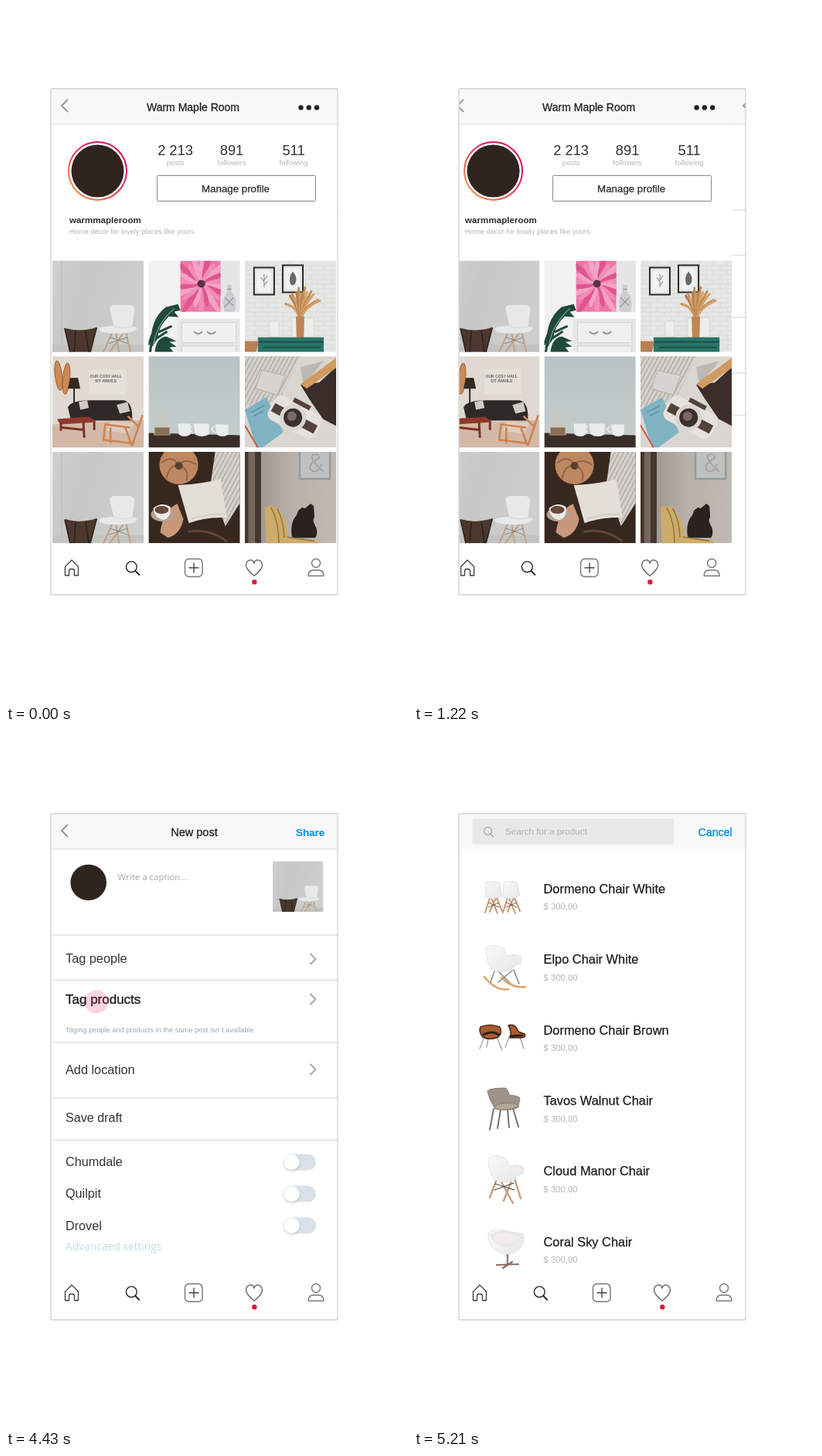
An HTML page that plays this animation: 520 by 902 pixels, repeating every 8000 ms.

```html
<!DOCTYPE html>
<html lang="en">
<head>
<meta charset="utf-8">
<title>Tagging products</title>
<style>
html, body { margin: 0; width: 100%; height: 100%; overflow: hidden; background: #fff; }
svg { display: block; }
text { font-family: "Liberation Sans", Arial, sans-serif; }
.open { font-family: "Open Sans", sans-serif; }
.line { fill: none; stroke-linecap: round; stroke-linejoin: round; }
</style>
</head>
<body>
<svg width="520" height="902" viewBox="0 0 520 902">
<defs>
  <clipPath id="phone"><rect x="58.5" y="107" width="370.5" height="655"/></clipPath>
  <linearGradient id="ring" x1="1" y1="0" x2="0" y2="1">
    <stop offset=".3" stop-color="#e0115f"/><stop offset="1" stop-color="#f8a13c"/>
  </linearGradient>
  <linearGradient id="wall" x2="1" y2=".3">
    <stop stop-color="#cfd0ce"/><stop offset=".4" stop-color="#c6c8c6"/><stop offset="1" stop-color="#cdcfcd"/>
  </linearGradient>
  <linearGradient id="mist" x2="0" y2="1">
    <stop stop-color="#b9c3c3"/><stop offset="1" stop-color="#c6cdcc"/>
  </linearGradient>
  <linearGradient id="dusk" x2="1">
    <stop stop-color="#968c84"/><stop offset=".5" stop-color="#b8b0a9"/><stop offset="1" stop-color="#c1bab3"/>
  </linearGradient>
  <linearGradient id="shell" x2="1" y2="1">
    <stop stop-color="#f8f8f8"/><stop offset="1" stop-color="#e6e7e9"/>
  </linearGradient>
  <filter id="soft" x="-50%" y="-50%" width="200%" height="200%">
    <feDropShadow dx="0" dy="2" stdDeviation="2" flood-opacity=".15"/>
  </filter>
  <pattern id="print" width="5" height="5" patternUnits="userSpaceOnUse" patternTransform="rotate(28)">
    <path fill="#d4d1cc" d="M0 0h5v5h-5z"/><path fill="#b2aea8" d="M0 0h1.6v5h-1.6z"/>
  </pattern>
  <pattern id="brick" width="18" height="12" patternUnits="userSpaceOnUse">
    <path fill="#e6e6e4" d="M0 0h18v12h-18z"/>
    <path class="line" stroke="#dad9d6" d="M0 .5H18M0 6.5H18M4 0V6M13 6V12"/>
  </pattern>

  <symbol id="chair" viewBox="0 0 118 118">
    <path fill="url(#wall)" d="M0 0h118v118H0z"/>
    <path stroke="#bbbdbb" d="M12 0V118"/>
    <path fill="#c3c3c0" d="M0 108h118v10H0z"/>
    <path fill="#4b372e" d="M16 87q20 6 41-1l-8 32H22z"/>
    <path class="line" stroke="#2a1f1b" stroke-width="1.5" d="M16 88l7 30M30 91l-2 27M43 91l4 27M57 87l-8 31"/>
    <path class="line" stroke="#c4a183" stroke-width="2" d="M77 93L66 118M82 93l4 25M95 93l6 25M92 93L74 118"/>
    <path class="line" stroke="#777" stroke-width=".8" d="M75 99l22 8M97 99l-24 8"/>
    <path fill="#e7e8e8" d="M74 62q0-5 7-5h18q7 0 7 6l-3 22q7 0 6 3-3 6-25 6-23 0-24-6 0-3 19-4z"/>
    <path class="line" stroke="#d5d6d6" d="M79 84q12 5 24 1"/>
  </symbol>

  <symbol id="flower" viewBox="0 0 118 118">
    <path fill="#f1f1f1" d="M0 0h118v118H0z"/>
    <path fill="#e5e5e5" d="M93 0h25v66H93z"/>
    <svg x="41" width="52" height="66">
      <path fill="#ee74a8" d="M0 0h52v66H0z"/>
      <g id="petals"></g>
      <circle cx="27" cy="30" r="5" fill="#5b3340"/>
    </svg>
    <path fill="#cccdd0" d="M101 31h6v10q9 8 4 25H98q-5-15 3-25z"/>
    <path class="line" stroke="#8f9095" d="M99 48l10 10M109 48L98 60M102 37h4"/>
    <path fill="#fafafa" d="M33 67h85v8H33z"/>
    <path fill="#e6e6e6" d="M37 75h81v43H37z"/>
    <path fill="#efefef" stroke="#d2d2d2" d="M43 80h70v26H43zM43 110h70v12H43z"/>
    <path class="line" stroke="#999" stroke-width="2" d="M59 92q5 5 10 0M76 92q5 5 10 0"/>
    <path fill="#20493a" d="M4 112Q0 78 22 60l16-4 3 8-8 2 6 7-13-1Q12 86 12 100zM8 118q2-19 15-20l13 6-9 1 9 6-9 1 5 6z"/>
    <path class="line" stroke="#20493a" stroke-width="3" d="M2 118Q4 94 18 78M0 108l9-24M14 92l15-7M11 100l12-8"/>
    <path class="line" stroke="#8aa898" d="M6 110Q10 82 33 62"/>
  </symbol>

  <symbol id="wheat" viewBox="0 0 118 118">
    <path fill="url(#brick)" d="M0 0h118v118H0z"/>
    <path fill="#e4e8e6" stroke="#2b2b2b" stroke-width="2" d="M12 9h26v35H12zM49 6h26v35H49z"/>
    <path fill="#f1f2ef" d="M16 13h18v27H16zM53 10h18v27H53z"/>
    <path class="line" stroke="#8a8d8b" d="M25 34V18M25 27l-4-5M25 25l4-5M25 32l4-5"/>
    <path fill="#666b69" d="M62 14q7 8 3 16-4 4-6 0-3-8 3-16z"/>
    <path fill="#eeedeb" stroke="#d6d5d2" d="M32 78h12v20H32zM61 74h28v25H61z"/>
    <g id="sheaf"></g>
    <path fill="#bd8654" d="M66 72h11l-1 33H67z"/>
    <path fill="#2a7468" d="M17 99h85v19H17z"/>
    <path class="line" stroke="#175049" stroke-width="2" d="M18 105h83M25 112h72"/>
    <path fill="#b78154" d="M0 104h18l-3 14H0z"/>
  </symbol>

  <symbol id="lounge" viewBox="0 0 118 118">
    <path fill="#dfd9d2" d="M0 0h118v118H0z"/>
    <path fill="#d3b8a8" d="M0 88l118-6v36H0z"/>
    <g fill="#cd8a55" stroke="#9c6036">
      <ellipse cx="8" cy="25" rx="4.500" ry="19" transform="rotate(-7 8 25)"/>
      <ellipse cx="18" cy="29" rx="4.500" ry="20" transform="rotate(5 18 29)"/>
    </g>
    <path fill="#34291f" d="M23 28h10l3 14H20zM27 42h2v28h-2z"/>
    <path fill="#e5e0d9" d="M47 17h48v32H47z"/>
    <text x="69" y="28" font-size="5" font-weight="700" text-anchor="middle" fill="#666">OUR COSY HALL</text>
    <text x="69" y="34" font-size="5" font-weight="700" text-anchor="middle" fill="#666">SIT AWHILE</text>
    <path fill="#2f2928" d="M20 66q4-9 30-9h42q12 2 11 26H24z"/>
    <path fill="#cfc9c2" d="M34 59l11-2 2 10-11 2zM83 63l14-4 3 12-13 3z"/>
    <path fill="#8f392b" d="M6 81l42-3 9 7-47 3z"/>
    <path class="line" stroke="#7d3125" stroke-width="3" d="M11 87v8M40 86l1 18M54 86v8M13 92l27 3"/>
    <path fill="#dfcdbd" d="M76 84l30 2-8 14-28-4z"/>
    <path class="line" stroke="#cb8550" stroke-width="2.600" d="M116 77l-13 38M68 88l32 4M68 90l-2 18 34 4M75 93v18M98 78l12 12M94 92l8 22"/>
  </symbol>

  <symbol id="cups" viewBox="0 0 118 118">
    <path fill="url(#mist)" d="M0 0h118v118H0z"/>
    <path fill="#3a2d2a" d="M0 99l118 3v16H0z"/>
    <path fill="#c8c8c0" d="M9 72h17l-4 11 6 7v12H7V90l6-7z"/>
    <path fill="#8b6e57" d="M8 92h19v10H8z"/>
    <path fill="#ebedeb" d="M38 87h16v14q-8 5-15 0zM58 87h20v14q-9 5-18 0zM86 88h17v13q-8 5-15 0z"/>
    <path class="line" stroke="#e6e8e6" stroke-width="2" d="M56 90q-5 4 0 8M84 91q-5 4 1 7"/>
  </symbol>

  <symbol id="desk" viewBox="0 0 118 118">
    <path fill="#d9d6d1" d="M0 0h118v118H0z"/>
    <path fill="url(#print)" d="M0 0h72L44 58 0 66z"/>
    <path fill="#d6d4d0" stroke="#b5b2ad" d="M22 18l30 7-10 25-28-8z"/>
    <path fill="#bdb7b1" d="M72 14l30-8-26 32z"/>
    <path fill="#3b2e2a" d="M72 37l24-3 22-20v76l-17-9-18-26z"/>
    <path fill="#d09a60" d="M118 2v13L80 42l-8-6z"/>
    <path fill="#80b3c4" d="M0 69l28-16 22 45-27 20h-8z"/>
    <path stroke="#cf5545" stroke-width="2" d="M0 89l17 29"/>
    <path class="line" stroke="#5a8fa2" stroke-width="1.500" d="M9 72l16-8M12 77l12-6"/>
    <g transform="rotate(28 64 78)">
      <rect x="31" y="61" width="68" height="35" rx="9" fill="#e6e1dc"/>
      <path fill="#54423a" d="M34 74h62v12H34zM53 56h24v6H53z"/>
      <circle cx="63" cy="80" r="17" fill="#d9d4cf"/>
      <circle cx="63" cy="80" r="12" fill="#3a302d"/>
      <circle cx="61" cy="79" r="6" fill="#7c6b64"/>
    </g>
  </symbol>

  <symbol id="coffee" viewBox="0 0 118 118">
    <path fill="#37281f" d="M0 0h118v118H0z"/>
    <path fill="url(#print)" d="M86 0h32v66L99 96 80 42z"/>
    <circle cx="39" cy="17" r="25" fill="#bd8760"/>
    <path class="line" stroke="#946445" stroke-width="2" d="M17 14q15-11 22 4M23 34q4-18 16-16M49 37q4-15-10-19M61 16q-16-9-22 2"/>
    <circle cx="39" cy="18" r="5" fill="#5c3e2d"/>
    <path fill="#c9977a" d="M15 104q4-28 22-37l8 20q-4 20-20 24z"/>
    <path fill="#e3ded8" d="M38 43q30-1 55-8l8 50q-27-1-49 7z"/>
    <path class="line" stroke="#d5cec6" stroke-width="2" d="M56 86q26-7 42-5"/>
    <ellipse cx="18" cy="81" rx="15" ry="9" fill="#b5a195"/>
    <path fill="#efebe7" d="M6 73q11-9 22-2 2 13-8 17-12-1-14-15z"/>
    <ellipse cx="17" cy="75" rx="9" ry="5" fill="#6a4838"/>
    <path class="line" stroke="#5f4638" stroke-width="3" d="M52 103q28-4 48 12"/>
  </symbol>

  <symbol id="cat" viewBox="0 0 118 118">
    <path fill="url(#dusk)" d="M0 0h118v118H0z"/>
    <path fill="#44372f" d="M0 0h5v118H0zM13 0h8v118H13z"/>
    <path fill="#776458" d="M5 0h8v118H5z"/>
    <path fill="#bfc1c0" stroke="#949c9e" stroke-width="2.500" d="M71-2h39v37H71z"/>
    <path class="line" stroke="#a0a6a7" stroke-width="2" d="M101 25Q82 8 88 4q8-3 8 4-16 9-10 16 8 5 13-8"/>
    <path fill="#29221f" d="M61 111q-3-20 6-29l2-6 5-4 4 1 7-6 4 3 1 14q-3 5 0 9 6 11 1 18z"/>
    <path fill="#cdab69" d="M26 73q6-6 14-1 14 10 17 38l35 4 4 6H28z"/>
    <path class="line" stroke="#94743f" stroke-width="1.500" d="M34 72q10 18 10 45M42 74q8 14 9 36M55 110l34 5"/>
  </symbol>

  <g id="nav" class="line" stroke="#444" stroke-width="1.4">
    <path d="M76.500 725.500L85 717l8.500 8.500V737H88.500V731q0-2.500-3.500-2.500t-3.500 2.500V737H76.500z"/>
    <circle cx="162.300" cy="725.800" r="6.900" stroke="#222"/>
    <path stroke="#222" stroke-width="1.800" d="M167.300 731l5 5"/>
    <g stroke="#777"><rect x="231.500" y="715.500" width="22.500" height="23" rx="5"/><path stroke="#444" d="M237 727h12M243 721v12"/></g>
    <path stroke="#666" d="M321 737.500Q310 728.500 310.500 723q1-6 6-6 3.500 0 4.500 4 1-4 4.500-4 5 0 6 6 .5 5.500-10.500 14.500z"/>
    <g stroke="#777"><circle cx="401" cy="721" r="5.500"/><path d="M391 737.500q0-7.500 7-7.500h6q7 0 7 7.500z"/></g>
    <circle cx="321.300" cy="745.500" r="3.200" fill="#e5173f" stroke="none"/>
  </g>
</defs>
<g clip-path="url(#phone)"><g id="strip"></g></g>
<rect x="58" y="107" width="371" height="655" rx="1" fill="none" stroke="#d2d2d2" stroke-width="1.300"/>
<circle id="tap" fill="#ee2858"/>
</svg>
<script>
const $ = id => document.getElementById(id);
const WIDTH = 370, LOOP = 8000, STEP = 30;

// bold is an outline width that thickens the letters
const text = (x, y, size, str, fill = '#333', bold = 0, more = '') =>
  `<text x="${x}" y="${y}" font-size="${size}" fill="${fill}" stroke="${fill}" stroke-width="${bold}" ${more}>${str}</text>`;
const mid = 'text-anchor="middle"';
const path = (d, stroke, width = 1.5, fill = 'none') =>
  `<path class="line" d="${d}" stroke="${stroke}" stroke-width="${width}" style="fill:${fill}"/>`;
const image = (id, x, y, size) => `<use href="#${id}" x="${x}" y="${y}" width="${size}" height="${size}"/>`;
const header = line => `<path fill="#f8f8f8" d="M58 107h371v45.500H58z"/>` + (line ? path('M58 153H429', '#dedede', 1.2) : '');
const back = path('M79.500 121.500L72 129l7.500 7.500', '#999', 2);

$('petals').innerHTML = Array.from({length: 22}, (_, i) =>
  `<ellipse cx="27" cy="${i % 2 ? 4 : 13}" rx="3.500" ry="${i % 2 ? 20 : 14}" fill="${['#f5a3c4', '#e0568f', '#f08db5'][i % 3]}" transform="rotate(${i * 360 / 22} 27 30)"/>`).join('');
$('sheaf').innerHTML = Array.from({length: 17}, (_, i) => {
  const a = (i - 8) / 8, x = 75 + 22 * a, y = 39 + 17 * a * a + 5 * Math.sin(i * 1.9);
  return path(`M72 76Q${72 + 5 * a} 60 ${x} ${y}`, ['#c58d57', '#d5a26b', '#b37c4a'][i % 3], 3);
}).join('');

const stats = [[219, '2 213', 'posts'], [292, '891', 'followers'], [372, '511', 'following']];
const photos = ['chair', 'flower', 'wheat', 'lounge', 'cups', 'desk', 'chair', 'coffee', 'cat'];
const profile = header(true) + back +
  text(242, 136, 14, 'Warm Maple Room', '#222', .3, mid) +
  [381.5, 391.7, 402].map(x => `<circle cx="${x}" cy="131.500" r="3.200" fill="#222"/>`).join('') +
  `<circle cx="118.500" cy="213.500" r="37.500" fill="#fff" stroke="url(#ring)" stroke-width="2"/>
   <circle cx="118.500" cy="213.500" r="34" fill="#30241f"/>` +
  stats.map(([x, n, label]) => text(x, 192.5, 18.3, n, '#333', 0, mid) + text(x, 206, 9.5, label, '#b5b5b5', 0, mid)).join('') +
  '<rect x="195.500" y="219.500" width="205" height="33" rx="1" fill="#fff" stroke="#8d8585"/>' +
  text(297, 241, 13.3, 'Manage profile', '#2b2b2b', .25, mid) +
  text(82, 281, 11.6, 'warmmapleroom', '#2b2b2b', 0, 'font-weight="700"') +
  text(82, 295, 9.3, 'Home decor for lovely places like yours', '#b3b3b3') +
  photos.map((id, i) => image(id, 60 + i % 3 * 124.4, 329.5 + Math.floor(i / 3) * 123.7, 118.3)).join('');

const toggle = y => `<rect x="359" y="${y - 10.5}" width="42" height="21" rx="10.500" fill="#d8e2e8"/>
  <circle cx="369.500" cy="${y}" r="10" fill="#fff" filter="url(#soft)"/>`;
const post = header(true) + back +
  text(243.5, 136, 14.5, 'New post', '#222', .3, mid) +
  text(375, 136, 13.4, 'Share', '#0f95e2', .2, 'font-weight="700"') +
  '<circle cx="106.700" cy="196" r="23.300" fill="#30241f"/>' +
  text(144.5, 193, 11.5, 'Write a caption...', '#a5a5a5', 0, 'class="open"') +
  image('chair', 345, 168.5, 65.5) +
  [264, 322.5, 403, 475, 529.5].map(y => path(`M58 ${y}H429`, '#e2e2e2', 1.4)).join('') +
  [295, 347, 438].map(y => path(`M394 ${y - 6.5}l6.500 6.500l-6.500 6.500`, '#a5a5a5', 2)).join('') +
  text(77, 300, 16.3, 'Tag people') +
  text(77, 353, 17, 'Tag products', '#222', .4) +
  text(77, 390, 9.28, 'Taging people and products in the same post isn´t available', '#93abb9') +
  text(77, 444, 16.3, 'Add location') +
  text(77, 506, 16.1, 'Save draft') +
  ['Chumdale', 'Quilpit', 'Drovel'].map((s, i) => text(77, 563 + i * 41.3, 16.2, s) + toggle(558 + i * 41)).join('') +
  text(77, 672, 13.8, 'Advancaed settings', '#c6dce5', 0, 'class="open"');

const WOOD = '#c79a73', METAL = '#8b8784';
const sideChair = x => path(`M${x - 5} 216l-6 19M${x + 4} 216l7 17M${x - 3} 216l8 20M${x + 3} 216l-8 18`, WOOD, 2) +
  path(`M${x - 7} 222l14 6M${x + 7} 222l-14 6`, '#6b625d', 1) +
  path(`M${x - 9} 196q9-3 16 0l4 17q-10 6-22 2z`, '#e3dfe0', 1, 'url(#shell)');
const armShell = (x, y) => path(`M${x} ${y + 3}q9-6 23 2l3 9q12-4 19 2l-1 8q-8 1-12 9-17 4-26-2-9-14-6-28z`, '#e6e6e8', 1, 'url(#shell)');
const icons = [
  sideChair(103) + sideChair(126),
  path('M104 311l-5 14M108 310l17 17M127 310l-18 15M129 309l7 18', METAL) +
    path('M91 318q15 19 31 16M113 319q15 15 31 12', '#d9a56f', 2.5) + armShell(94, 277),
  path('M91 396l-6 15M107 396l7 17M96 398l-2 11M123 396l-5 13M137 396l5 15', '#aaa') +
    path('M86 383q12-5 25 0 4 7-2 13-11 5-20 0-6-7-3-13z', '#4d2b1d', 1.5, '#a75c31') + path('M90 393q10-6 20 0', '#2d201b', 3) +
    path('M122 381q9-3 13 8l8 3q3 4-4 5h-15q3-8-2-16z', '#4d2b1d', 1.5, '#a75c31') + path('M125 395l15-1', '#2d201b', 3),
  path('M103 489l-5 27M112 490l-4 24M128 488l7 24M121 489l2 24', '#777371', 2) +
    path('M95 466q2-4 23-4 4 2 5 9 12 1 14 4l-2 12q-12 6-30 2-8-12-10-23z', '#877c72', 1, '#9e9287') +
    path('M105 486q5-6 26-4l4 4q-14 7-30 3z', '#8a7d72', 1, '#b3a79a'),
  path('M107 580l-9 24M111 580l17 31M127 580l-11 28M130 579l8 26', WOOD, 2.3) +
    path('M105 586l25 8M129 585l-25 9', '#4e4744', 1.2) + armShell(97, 549),
  path('M121 675v16', METAL, 2.5) + path('M107 691l28-1M115 695l12-8', '#8b6f5f', 2.2) +
    path('M96 650q9-8 24-3l22 4q2 17-12 24-14 5-24-3-11-8-10-22z', '#e4e4e6', 1, 'url(#shell)') +
    path('M99 652q15-10 40 2-8 13-23 12-12-1-17-14z', '#e6dfe1', 1, '#f0ebec'),
];
const products = ['Dormeno Chair White', 'Elpo Chair White', 'Dormeno Chair Brown', 'Tavos Walnut Chair', 'Cloud Manor Chair', 'Coral Sky Chair'];
const search = header(false) +
  '<rect x="75.500" y="113.500" width="261" height="33" rx="2" fill="#e8e8e8"/>' +
  '<circle cx="95.500" cy="129.500" r="5" fill="none" stroke="#aaa" stroke-width="1.300"/>' + path('M99 133.500l3.500 3', '#aaa', 1.5) +
  text(118, 134, 11.7, 'Search for a product', '#b2b2b2') +
  text(367.5, 135.5, 14.2, 'Cancel', '#0f95e2', .45) +
  products.map((name, i) => {
    const y = 209.7 + i * 91.4;
    return icons[i] + text(167.5, y, 16.4, name, '#1d1d1d', .25) + text(167.5, y + 21.7, 11.3, '$ 300,00', '#b5b5b5');
  }).join('');

$('strip').innerHTML = [profile, post, search].map((body, i) =>
  `<g transform="translate(${i * WIDTH})">${body}<use href="#nav"/></g>`).join('');

const taps = [{start: 500, steps: 8, x: 248, y: 462}, {start: 4430, steps: 9, x: 117, y: 350.5}];

function slide(t, start) {
  const p = Math.min(Math.max(Math.floor((t - start) / STEP) + 1, 0), 8) / 8;
  return p * p * (3 - 2 * p);
}

function draw(now) {
  const t = now % LOOP;
  $('strip').setAttribute('transform', `translate(${-WIDTH * (slide(t, 1220) + slide(t, 5000))})`);
  const tap = taps.find(a => t >= a.start && t < a.start + a.steps * STEP);
  $('tap').setAttribute('r', 0);
  if (tap) {
    const p = Math.floor((t - tap.start) / STEP) / tap.steps;
    const look = {cx: tap.x, cy: tap.y, r: 15 + 52 * p, opacity: .2 * (1 - p)};
    for (const key in look) $('tap').setAttribute(key, look[key]);
  }
}

const origin = performance.now();
function frame() {
  draw(performance.now() - origin);
  requestAnimationFrame(frame);
}
frame();
</script>
</body>
</html>
```
